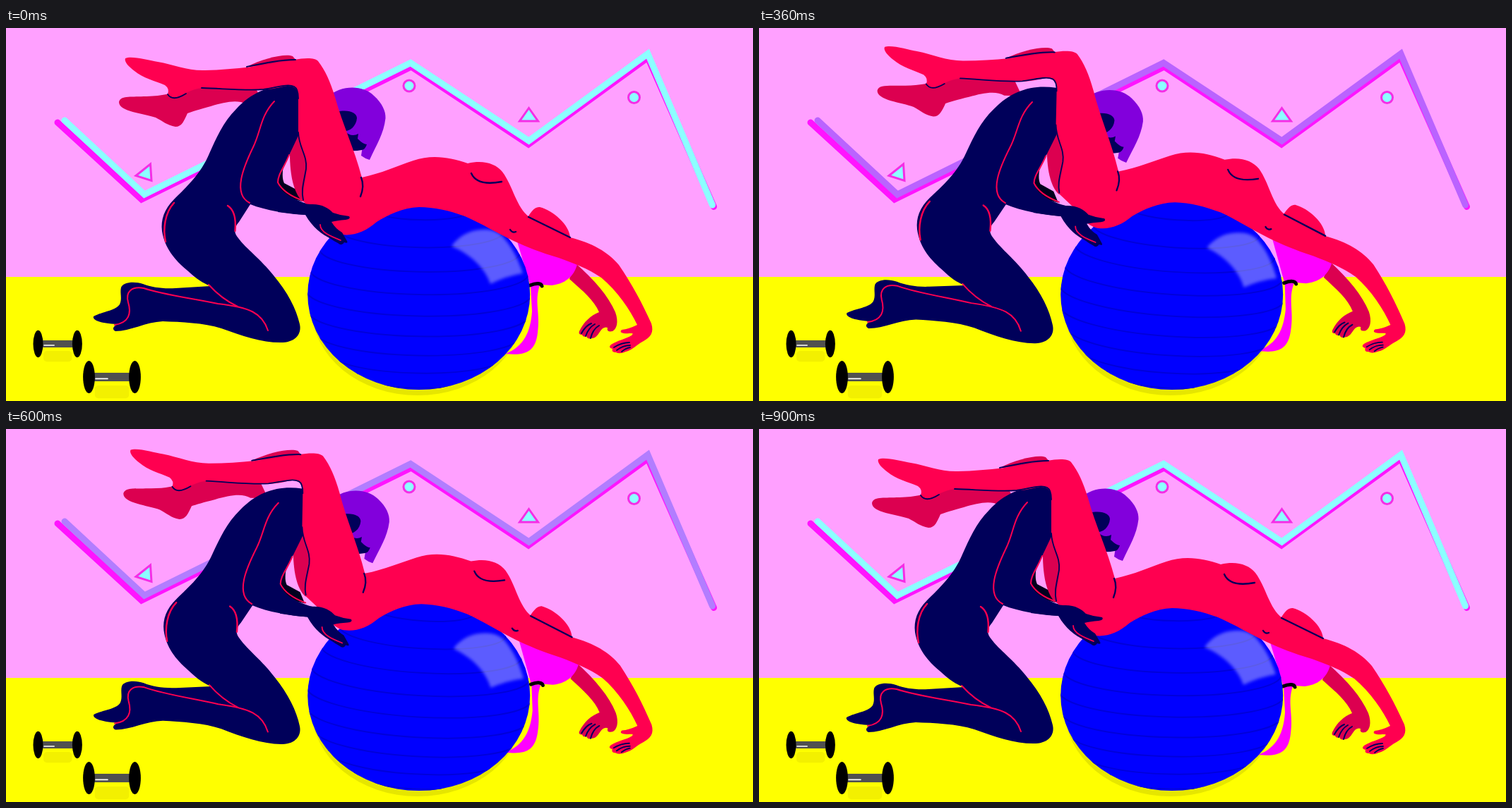
An HTML page with a canvas for the animation above (930 ms loop, 1058x529 px).

```html
<!DOCTYPE html>
<html lang="en">
<head>
<meta charset="utf-8">
<title>Gym ball</title>
<style>
html, body { margin: 0; width: 100%; height: 100%; overflow: hidden; background: #ffa0ff; }
canvas { display: block; width: 100vw; height: 100vh; }
</style>
</head>
<body>
<canvas id="stage" width="1058" height="529"></canvas>
<script>
const ctx = document.getElementById('stage').getContext('2d');
const LOOP = 930, STEP = 30, HALF = 450;
const RED = '#ff0050', DARK_RED = '#dc0050', NAVY = '#00005a', MAGENTA = '#ff14ff', AQUA = '#8cffff';
const BALL = { x: 584.7, y: 378, rx: 157.5, ry: 135 };

function fill(d, color) {
  ctx.fillStyle = color;
  ctx.fill(new Path2D(d));
}

function line(d, color, width = 2, cap = 'round') {
  ctx.strokeStyle = color;
  ctx.lineWidth = width;
  ctx.lineCap = cap;
  ctx.stroke(new Path2D(d));
}

function oval(x, y, rx, ry, color) {
  ctx.fillStyle = color;
  ctx.beginPath();
  ctx.ellipse(x, y, rx, ry, 0, 0, Math.PI * 2);
  ctx.fill();
}

function turned(x, y, angle, draw) {
  ctx.save();
  ctx.translate(x, y);
  ctx.rotate(angle);
  ctx.translate(-x, -y);
  draw();
  ctx.restore();
}

const asWoman = (u, draw) => turned(897, 440, 0.0275 * u, draw);
const asMan = (u, draw) => turned(340, 422, 0.0275 * u, draw);

function wall(u) {
  ctx.fillStyle = '#ffa0ff';
  ctx.fillRect(0, 0, 1058, 529);
  ctx.fillStyle = '#ffff00';
  ctx.fillRect(0, 353, 1058, 176);
  ctx.lineJoin = 'miter';
  line('M73,134 L192,243 L574,55 L740,165 L909,42 L1002.5,253.5', MAGENTA, 9);
  const mix = (a, b) => Math.round(a + (b - a) * u);
  line('M83,131 L196,236 L573,49.5 L740.5,160 L909,36.5 L1000.5,251',
    `rgb(${mix(140, 197)},${mix(255, 60)},255)`, 9);
  const badges = [
    'M579,82 A8,8 0 1 1 563,82 A8,8 0 1 1 579,82 Z',
    'M897.5,98.5 A8,8 0 1 1 881.5,98.5 A8,8 0 1 1 897.5,98.5 Z',
    'M740.5,113.5 L753.5,132 L727.5,132 Z',
    'M204.5,193 L206,216.5 L184,209.5 Z'
  ];
  for (const d of badges) {
    fill(d, AQUA);
    line(d, '#f52de6', 3);
  }
}

function dumbbell(x, y, gap, rx, ry) {
  const k = ry / 19;
  ctx.fillStyle = '#f3f000';
  ctx.beginPath();
  ctx.roundRect(x - 20 * k, y + 10 * k, 40 * k, 15 * k, 5);
  ctx.fill();
  ctx.fillStyle = '#505050';
  ctx.fillRect(x - gap, y - 5 * k, gap * 2, 10 * k);
  line(`M${x - 19 * k},${y + 2 * k} h${14 * k}`, '#fff', 1.6);
  oval(x - gap, y, rx, ry, '#000');
  oval(x + gap, y, rx, ry, '#000');
}

function farLeg() {
  fill('M160,105 C162,96 175,98 195,97 C220,97 230,93 250,89 L280,82 L350,78 L365,108 L340,108 ' +
    'C328,101 310,105 290,111 C275,115 262,119 257,121 C252,132 249,140 240,140 ' +
    'C228,138 222,132 212,127 C195,121 160,119 160,105 Z', DARK_RED);
  fill('M341,55 C365,43 395,36 406,40 L412,47 L380,54 Z', DARK_RED);
}

function head() {
  fill('M455,98 C475,80 506,81 521,96 C533,107 538,118 537.5,128 C535,150 525,165 515,187 ' +
    'Q508,185 503,181 L505,168 L465,155 Z', '#8200dc');
  fill('M468,119 C485,115 497,120 497,128 C496,139 488,147 475,147 Z', NAVY);
  fill('M478,145 Q489,156 499,150 L498,157 Q506,165 511,165 Q509,172 504,173 Q495,175 484,174 Z', NAVY);
}

function farLimbs(u) {
  asMan(u, () => fill('M394,188 C391,205 391,214 394,220 L413,230 L420,246 L395,240 L383,222 Z', '#00001e'));
  asWoman(u, () => fill('M414,145 L402,178 C402,210 408,235 420,246 L432,246 L428,190 Z', DARK_RED));
}

function manBody() {
  fill('M413,83 C380,79 351,88 326,115 C307,134 298,156 288,178 C276,207 255,226 238,243 ' +
    'C224,257 219,272 221,288 C225,312 238,328 257,344 C270,356 279,362 290,366 L240,369 ' +
    'C222,370 207,368 194,363 C182,359 166,360 163,368 C161,376 165,384 161,392 ' +
    'C155,401 137,402 124,409 C122,414 133,419 158,420 C150,424 151,428 155,430 ' +
    'C176,430 198,417 222,416 C248,417 280,418 305,426 C335,437 365,447 392,446 ' +
    'C411,445 419,433 416,420 C411,398 399,375 379,351 C361,328 340,313 329,298 ' +
    'C323,291 322,284 330,275 L346,250 C368,259 398,263 424,265 L440,252 ' +
    'C420,249 388,237 386,220 C388,206 398,190 403,176 L420,140 L430,90 Z', NAVY);
  line('M380,104 C360,125 361,147 350,169 C337,196 320,235 345,248', RED);
  line('M238,248 C225,262 222,285 226,303', RED, 2.4);
  line('M314,252 Q327,260 324.5,288', RED, 2.4);
  line('M154,421 C174,418 178,405 173,389 C169,374 178,366 195,369 C225,379 263,383 300,391 ' +
    'C345,396 363,404 371,429', RED);
  line('M287,364 Q305,384 328,395', RED);
  line('M401,180 C394,198 385,207 385,219 Q393,235 421,245', RED);
}

function manHand() {
  fill('M395,238 Q412,250 431,250 C446,249 457,255 463,262 Q474,266 486,267 Q489,271 481,272 ' +
    'Q469,273 461,275 Q467,285 476,290 L483,302 Q485,306 479,304 Q476,310 470,305 ' +
    'Q464,302 460,299 C447,292 435,284 424,265 Q405,264 385,261 Z', NAVY);
  line('M445,279 C445,290 461,296 474,301', RED, 1.8);
}

function backHead() {
  fill('M806,333 C834,358 853,380 863,403 C868,417 865,427 859,430 Q850,432 852,425 ' +
    'Q846,423 841,431 Q835,441 829,440 Q824,442 822,437 Q817,439 816,435 Q810,435 812,430 ' +
    'C819,416 828,408 840,403 C833,386 817,373 798,356 Z', DARK_RED);
  line('M815,433 Q821,422 829,419 M821,437 Q825,425 834,420 M828,440 Q831,427 840,422', NAVY, 2);
  fill('M743,365 L756,365 C748,388 757,405 753,432 C750,460 735,465 707,462 C734,452 743,430 745,402 Z', '#ff00ff');
  fill('M722,296 L809,335 C806,347 797,362 773,365 L742,363 Z', '#ff00ff');
  line('M742,365 C752,361 758,362 759,366', '#000', 5);
}

function ball(u) {
  const { x, y, rx, ry } = BALL;
  ctx.save();
  ctx.beginPath();
  ctx.ellipse(x, y, rx, ry, 0, 0, Math.PI * 2);
  ctx.fillStyle = '#0000ff';
  ctx.fill();
  ctx.clip();
  turned(x, y, 0.02 + 0.06 * u, () => {
    ctx.strokeStyle = '#0000da';
    ctx.lineWidth = 2;
    for (let i = 0; i < 9; i++) {
      const cy = 257 + i * 29.5;
      const half = rx * Math.sqrt(Math.max(0.05, 1 - ((cy - y) / ry) ** 2)) + 2;
      ctx.beginPath();
      ctx.ellipse(x, cy, half, half * 0.21, 0, 0, Math.PI);
      ctx.stroke();
    }
  });
  turned(x, y, 0.06 * u, () => {
    ctx.filter = 'blur(2px)';
    fill('M632,308 C642,295 656,287 673,286 Q689,284 701,293 C717,310 725,327 732,348 ' +
      'Q708,352 686,363 C679,342 660,322 632,310 Z', 'rgba(255,255,255,.36)');
    ctx.filter = 'none';
  });
  ctx.restore();
}

function woman() {
  fill('M735,274 C743,262 748,253 756,254 C775,259 798,279 799,297 L770,306 Z', RED);
  fill('M169,43 C178,39 202,46 215,48 C238,52 258,61 282,60 C325,59 367,53 408,45 ' +
    'C424,42 438,42 442,47 C452,60 459,75 466,98 C477,138 493,170 504,212 ' +
    'C532,206 553,196 577,188 C603,179 628,183 654,192 C676,187 693,192 703,204 ' +
    'C718,224 723,255 741,268 L799,297 C830,305 852,317 868,336 C887,364 900,388 914,419 ' +
    'C918,432 913,438 903,444 C893,449 887,457 878,459 Q869,463 864,460 Q857,460 859,455 ' +
    'Q852,453 857,449 C866,443 878,441 886,436 C891,431 883,434 875,433 Q868,432 872,428 ' +
    'Q882,427 894,421 C884,400 866,373 843,354 C824,341 805,334 783,326 C756,318 739,311 719,302 ' +
    'C696,291 673,277 650,267 C628,259 606,254 585,254 C561,255 541,265 525,275 ' +
    'C509,289 493,295 476,293 C461,290 451,276 440,263 L420,245 C421,226 428,204 425,189 ' +
    'C419,172 414,165 414,148 L414,98 C414,86 408,82 399,82 C385,84 375,89 350,87 ' +
    'L277,85 C262,87 252,94 242,98 Q230,102 229,94 Q232,86 225,81 C211,75 194,71 182,61 ' +
    'C174,55 167,48 169,43 Z', RED);
  line('M277,85 C310,86 340,89 365,87 C385,84 399,79 408,83 Q414,86 414,100', NAVY, 1.8);
  line('M229,94 Q236,105 255,93', NAVY, 1.8);
  line('M341,55 C365,50 388,45 410,45', NAVY);
  line('M414,148 C415,171 427,180 425,200 C421,222 418,230 421,244', NAVY, 1.8);
  line('M503,212 Q508,224 502,239', NAVY, 2.3);
  line('M659,206 C665,220 681,222 702,218', NAVY, 2.3);
  line('M740,268 L799,297', NAVY, 2.3);
  line('M714,286 Q717,291 722,289', NAVY, 2.3);
  line('M861,453 Q872,446 883,446 M865,457 Q874,450 884,450 M872,459 Q878,454 884,453', NAVY, 1.8);
}

function paint(u) {
  wall(u);
  dumbbell(73.2, 448, 27.7, 7, 19.2);
  dumbbell(150, 495, 32.5, 8.4, 23);
  oval(583, 398, 150, 123, '#e6e600');
  asWoman(u, farLeg);
  asMan(u, head);
  farLimbs(u);
  asMan(u, manBody);
  asWoman(u, backHead);
  ball(u);
  asWoman(u, woman);
  asMan(u, manHand);
}

function tick(now) {
  const t = Math.floor((now % LOOP) / STEP) * STEP;
  paint(Math.max(0, 1 - Math.abs(t - HALF) / HALF));
  requestAnimationFrame(tick);
}
paint(0);
requestAnimationFrame(tick);
</script>
</body>
</html>
```
